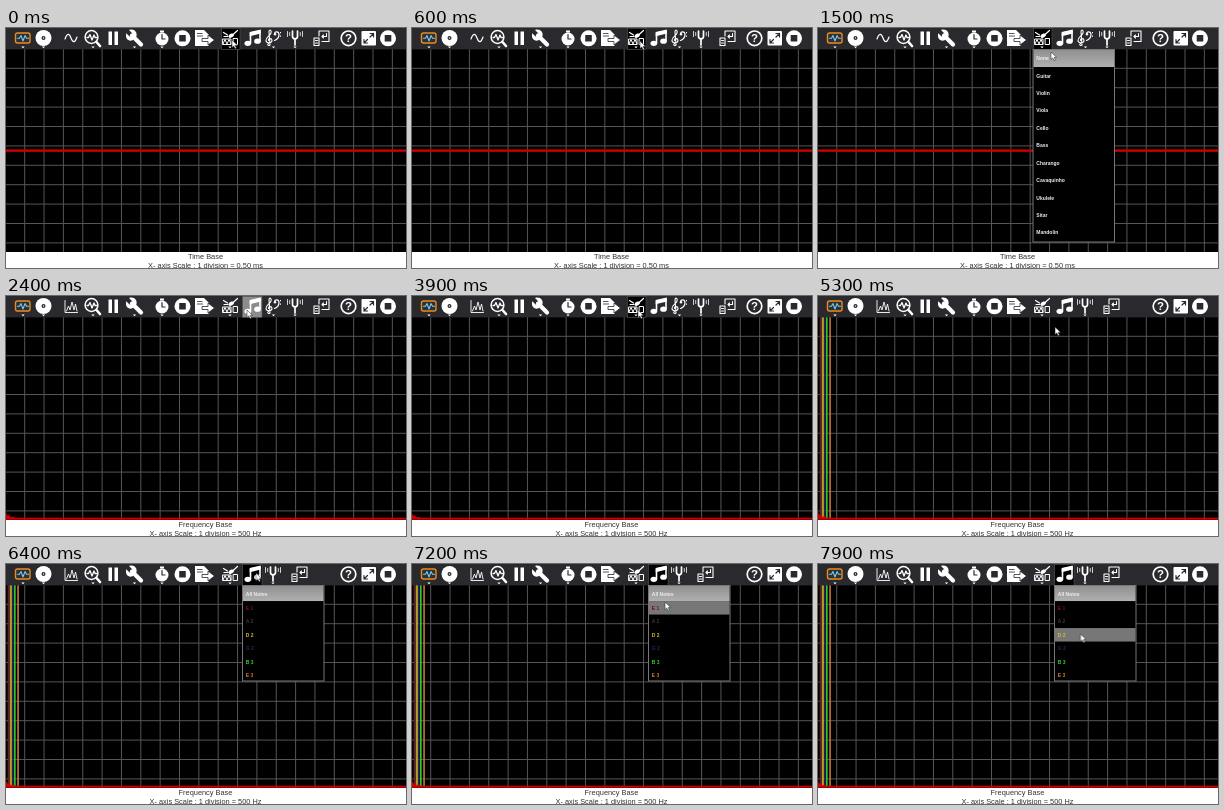
Animation, 400 px wide and 240 px high, one loop 8 s. Source, as an HTML page:

```html
<!DOCTYPE html>
<html lang="en">
<head>
<meta charset="utf-8">
<title>Scope toolbar</title>
<style>
html, body { margin: 0; width: 100%; height: 100%; overflow: hidden; background: #000; }
svg { display: block; width: 400px; height: 240px; }
text { font-family: "Liberation Sans", Arial, sans-serif; }
.caption { font-size: 7.4px; fill: #333; text-anchor: middle; }
.menu text { font-size: 5px; font-weight: bold; fill: #eee; }
.line { fill: none; stroke: #fff; stroke-width: 1.5; stroke-linecap: round; stroke-linejoin: round; }
.white { fill: #fff; }
.dark { fill: #2a2a2e; }
.hot { stroke: #555; stroke-width: .6; }

/* Every part shares one 8 s clock; 1% is 80 ms. */
.timed { animation: 8s step-end infinite; }
#timeMode, #sineIcon { animation-name: timeMode; }
#freqMode, #peakIcon { animation-name: freqMode; }
#strings { animation-name: tuned; }
#clefs { animation-name: untuned; }
#tuning { animation-name: slide; }
#hotInstrument { animation-name: hotInstrument; }
#hotNotes { animation-name: hotNotes; }
#hotClef { animation-name: hotClef; }
#instruments { animation-name: instruments; }
#notes { animation-name: notes; }
#instruments .row1 { animation-name: hoverGuitar; }
#notes .row1 { animation-name: hoverFirst; }
#notes .row2 { animation-name: hoverSecond; }
#notes .row3 { animation-name: hoverThird; }
#peaks { transform-origin: 0 223px; animation: flicker .8s step-end infinite; }
#cursor { animation: wander 8s linear infinite; }

@keyframes timeMode { 0% { opacity: 1 } 21.25%, 100% { opacity: 0 } }
@keyframes freqMode { 0% { opacity: 0 } 21.25%, 100% { opacity: 1 } }
@keyframes tuned { 0% { opacity: 0 } 62.5%, 100% { opacity: 1 } }
@keyframes untuned { 0% { opacity: 1 } 62.5%, 100% { opacity: 0 } }
@keyframes slide { 0% { transform: none } 62.5%, 100% { transform: translateX(-22px) } }
@keyframes hotInstrument { 0% { opacity: 1 } 21.25% { opacity: 0 } 46.25% { opacity: 1 } 62.5%, 100% { opacity: 0 } }
@keyframes hotNotes {
  0% { opacity: 0; fill: #8c8c8c } 26.25% { opacity: 1; fill: #8c8c8c } 33.75% { opacity: 0; fill: #8c8c8c }
  70% { opacity: 1; fill: #8c8c8c } 78.75%, 100% { opacity: 1; fill: #000 }
}
@keyframes hotClef { 0% { opacity: 0 } 33.75% { opacity: 1 } 43.75%, 100% { opacity: 0 } }
@keyframes instruments { 0% { opacity: 0 } 8.75% { opacity: 1 } 21.25% { opacity: 0 } 51.25% { opacity: 1 } 62.5%, 100% { opacity: 0 } }
@keyframes notes { 0% { opacity: 0 } 78.75%, 100% { opacity: 1 } }
@keyframes hoverGuitar { 0% { opacity: 0 } 57.5% { opacity: 1 } 62.5%, 100% { opacity: 0 } }
@keyframes hoverFirst { 0% { opacity: 0 } 90% { opacity: 1 } 93.75%, 100% { opacity: 0 } }
@keyframes hoverSecond { 0% { opacity: 0 } 93.75% { opacity: 1 } 97.5%, 100% { opacity: 0 } }
@keyframes hoverThird { 0% { opacity: 0 } 97.5%, 100% { opacity: 1 } }
@keyframes flicker {
  0% { transform: scaleY(1) } 12.5% { transform: scaleY(.7) } 25% { transform: scaleY(.95) }
  37.5% { transform: scaleY(.6) } 50% { transform: scaleY(.85) } 62.5% { transform: scaleY(1.1) }
  75% { transform: scaleY(.75) } 87.5%, 100% { transform: scaleY(.9) }
}
@keyframes wander {
  0%, 4% { transform: translate(226px, 12px) }
  11.25% { transform: translate(230px, 14px) }
  18.75%, 21.25% { transform: translate(233px, 24px) }
  26.25% { transform: translate(239px, 18px) }
  30%, 32.5% { transform: translate(241px, 14px) }
  36.25%, 41.25% { transform: translate(266px, 13px) }
  47.5%, 51.25% { transform: translate(226px, 14px) }
  58.75%, 62.5% { transform: translate(236px, 46px) }
  66.25% { transform: translate(237px, 31px) }
  71.25%, 80% { transform: translate(250px, 9px) }
  86.25% { transform: translate(250px, 26px) }
  91.25% { transform: translate(254px, 42px) }
  98.75%, 100% { transform: translate(262.5px, 70px) }
}
</style>
</head>
<body>
<svg viewBox="0 0 400 240">
  <defs>
    <linearGradient id="shine" x2="0" y2="1">
      <stop stop-color="#909090"/><stop offset="1" stop-color="#b0b0b0"/>
    </linearGradient>
    <path id="drop" class="white" d="M-1.700 18.500h3.400l-1.700 1.800z"/>
    <g id="stop">
      <circle class="white" r="8" cy="10.300"/>
      <rect class="dark" x="-3.300" y="7" width="6.600" height="6.600" rx=".5"/>
    </g>
  </defs>

  <rect width="400" height="240"/>
  <path id="grid" stroke="#555" fill="none"/>
  <g id="strings" class="timed"></g>

  <rect y="224" width="400" height="16" fill="#fff"/>
  <g id="timeMode" class="timed">
    <rect y="121.400" width="400" height="2.400" fill="#d00000"/>
    <text class="caption" x="199.500" y="231">Time Base</text>
    <text class="caption" x="199.500" y="239.500">X- axis Scale : 1 division = 0.50 ms</text>
  </g>
  <g id="freqMode" class="timed">
    <rect y="221.700" width="400" height="2" fill="#d00000"/>
    <path id="peaks" fill="#d00000" d="M0 223V217l1.500 2.500 1.500-.5 1.500 2.300 2.500-1 2 1.700v1z"/>
    <text class="caption" x="199.500" y="231">Frequency Base</text>
    <text class="caption" x="199.500" y="239.500">X- axis Scale : 1 division = 500 Hz</text>
  </g>

  <rect class="dark" width="400" height="21.400"/>
  <rect id="hotInstrument" class="hot timed" x="215.500" y=".3" width="18.500" height="21"/>
  <rect id="hotNotes" class="hot timed" x="236.500" y=".3" width="19.500" height="21"/>
  <rect id="hotClef" class="hot timed" x="258" y=".3" width="18" height="21" fill="#8c8c8c"/>

  <!-- scope, disc -->
  <rect x="9.500" y="5" width="14.500" height="10" rx="2" fill="#24333c" stroke="#f08a18" stroke-width="1.400"/>
  <path d="M11.500 10.300h2l1.500-2.700 2 5.400 2-5.400 1.500 2.700h2" class="line" style="stroke:#8cc4e4;stroke-width:1.100"/>
  <circle class="white" cx="37.500" cy="10" r="8"/>
  <circle class="dark" cx="37.500" cy="10" r="2"/>
  <circle class="white" cx="37.500" cy="10" r=".7"/>

  <!-- display mode -->
  <path id="sineIcon" class="line timed" d="M59 11c2-6 4.200-6 6-1s4 5 6-1" style="stroke-width:1.200"/>
  <path id="peakIcon" class="line timed" d="M59 4.500v12h12.500M60.500 15l2-5 1.500 4 2-8 2 8 1.500-6 1.500 7" style="stroke-width:.9"/>

  <!-- magnifier, pause, wrench -->
  <circle class="line" cx="85.500" cy="9" r="6.400"/>
  <path class="line" d="M81 9.500h1.500l1.500-3 2 5.500 2-5 1 2.500h1.500" style="stroke-width:1.300"/>
  <path class="line" d="M90.500 14l3.500 4" style="stroke-width:2.600"/>
  <path class="white" d="M102.500 3.500h3.500v13.500h-3.500zM108.500 3.500h3.500v13.500h-3.500z"/>
  <path class="line" d="M126 7.500l9 9" style="stroke-width:4.200"/>
  <path class="white" d="M123 2l3.500 3.500-.5 2.500-2.500.5-3.200-3.200c-1.500 5 2 8.500 6.200 7l4-4c1-4.500-2.500-8-7.500-6.300z"/>

  <!-- timer, stop, export -->
  <circle class="white" cx="156" cy="11" r="6.500"/>
  <path class="white" d="M154 2.500h4v2h-4z"/>
  <path class="line" d="M156 6.500v4.500h3" style="stroke:#2a2a2e;stroke-width:1.200"/>
  <use href="#stop" x="176.500"/>
  <path class="white" d="M189 2h9l4.500 4.500v11.500h-13.500z"/>
  <path class="white" d="M196 10.500h6V7l6.500 5-6.500 5v-3.500h-6z" stroke="#2a2a2e" stroke-width=".8"/>
  <path d="M191 5.500h5.500M191 8h6" stroke="#2a2a2e" stroke-width=".8"/>

  <!-- instruments, notes -->
  <path class="line" d="M231.500 2.500l-5 4.500M217.500 4.500l4 2.500M218 8.500h4" style="stroke-width:1.200"/>
  <path class="white" d="M226 5.500c2 0 2.500 1.500 1.500 2.500s-3 3-4.500 1.500 1-4 3-4z"/>
  <path class="line" d="M217 11h8v5.500h-8zM217 16l2-4.500 2 4.500 2-4.500 2 4.500M227.500 10.500h4v6h-4z" style="stroke-width:1"/>
  <path class="line" d="M244.500 15V5l9.500-2V12.500" style="stroke-width:1.600"/>
  <path class="white" d="M243.700 4l11.100-2.600v4.200l-11.100 2.600z"/>
  <ellipse class="white" cx="241.800" cy="15.300" rx="3.300" ry="2.600"/>
  <ellipse class="white" cx="251.500" cy="13.200" rx="3.300" ry="2.600"/>

  <g id="clefs" class="timed">
    <path class="line" d="M264 17c-2 1.500-3-1-1.500-1.500M264 17L263 4c0-3 3-2 2 1-1 3-5 4-5 7.500 0 3 6 3 6 0 0-2.500-4-2.500-3.500 0" style="stroke-width:1.100"/>
    <path class="line" d="M268.500 6c0-3 4.500-3 4.500.5 0 3-2 5-4.500 6" style="stroke-width:1.200"/>
    <circle class="white" cx="269" cy="6.300" r="1.200"/>
    <path class="white" d="M274 4h1v1.300h-1zM274 7.500h1v1.300h-1z"/>
    <use href="#drop" x="267.500"/>
  </g>
  <g id="tuning" class="timed">
    <path class="line" d="M286.500 3v5.500c0 3 5 3 5 0v-5.500M289 11V17" style="stroke-width:1.700"/>
    <path class="line" d="M283.700 4.500v3M281.500 3.500v5M294.300 4.500v3M296.500 3.500v5" style="stroke-width:.8"/>
    <use href="#drop" x="289"/>
    <path class="line" d="M313 8V3h10v10.500h-7M320.500 5.500v3h-4.500l1.500-1.500m-1.500 1.500 1.500 1.500" style="stroke-width:1.100"/>
    <path class="line" d="M308 10h5v7.500h-5zM309.500 12.500h2M309.500 15h2" style="stroke-width:1.100"/>
  </g>

  <!-- help, expand, quit -->
  <circle class="line" cx="342.500" cy="10.300" r="7.300" style="stroke-width:1.700"/>
  <text class="white" x="342.500" y="14.300" font-size="11.500" font-weight="bold" text-anchor="middle">?</text>
  <rect class="white" x="355.500" y="3" width="14.500" height="14.500" rx="1"/>
  <path class="line" d="M358 15l3.500-3.500M364 9l3.500-3.500M364 5.500h3.500V9M358 11.500V15h3.500" style="stroke:#2a2a2e;stroke-width:1.200"/>
  <use href="#stop" x="382"/>
  <g id="drops"></g>

  <g id="instruments" class="menu timed"></g>
  <g id="notes" class="menu timed"></g>

  <path id="cursor" d="M0 0v7.500l1.800-1.600 1.300 2.800 1.300-.6-1.300-2.700h2.500z" fill="#fff" stroke="#222" stroke-width=".5"/>
</svg>
<script>
const $ = id => document.getElementById(id);
const division = 19.35;

function add(parent, tag, attrs, label) {
  const el = document.createElementNS("http://www.w3.org/2000/svg", tag);
  for (const key in attrs) el.setAttribute(key, attrs[key]);
  if (label) el.textContent = label;
  return parent.appendChild(el);
}

let grid = "";
for (let x = 18.7; x < 400; x += division) grid += `M${x} 21V224`;
for (let y = 40.3; y < 220; y += 19.4) grid += `M0 ${y}H400`;
$("grid").setAttribute("d", grid);

for (const x of [17, 37.5, 87, 128.5, 156, 224]) add($("drops"), "use", { href: "#drop", x });

// Rows are [label, colour]; the first one is the current choice.
function buildMenu(menu, x, step, bottom, rows) {
  add(menu, "rect", { x: x + .5, y: 21.5, width: 81.5, height: bottom - 21.5, fill: "#000", stroke: "#777" });
  rows.forEach(([label, colour], i) => {
    const mid = 30.3 + i * step;
    const top = i ? mid - step / 2 : 22;
    const box = { x: x + 1, y: top, width: 80.5, height: mid + step / 2 - top };
    if (!i) add(menu, "rect", { ...box, fill: "url(#shine)" });
    else add(menu, "rect", { ...box, class: `timed row${i}`, fill: "#777", opacity: 0 });
    add(menu, "text", { x: x + 3.8, y: mid + 1.8, style: `fill:${colour || "#eee"}` }, label);
  });
}

const names = "None Guitar Violin Viola Cello Bass Charango Cavaquinho Ukulele Sitar Mandolin".split(" ");
const strings = [
  ["E 1", "#7c1010", 82.4], ["A 2", "#3c3636", 110], ["D 2", "#d8b82c", 146.8],
  ["G 2", "#222a5c", 196], ["B 3", "#30d030", 246.9], ["E 3", "#c87a30", 329.6]
];
buildMenu($("instruments"), 214.5, 17.43, 214, names.map(name => [name]));
buildMenu($("notes"), 236, 13.5, 117, [["All Notes"], ...strings]);

for (const [, colour, hertz] of strings) {
  add($("strings"), "rect", { x: hertz / 500 * division - 1.5, y: 21, width: 1.6, height: 202, fill: colour });
}
</script>
</body>
</html>
```
